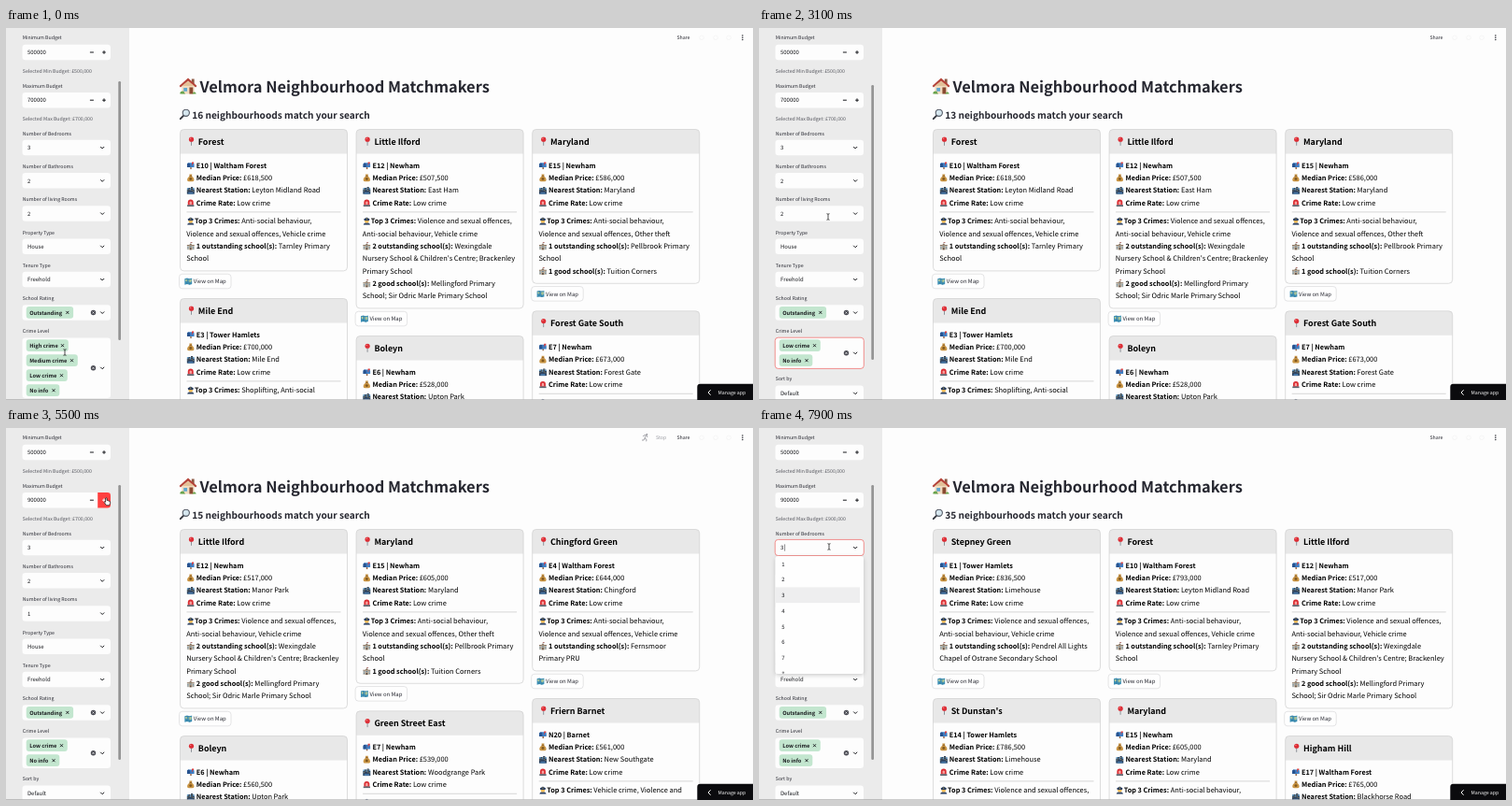
An HTML page for the animation above (8000 ms loop, 800 by 398 pixels).

```html
<!DOCTYPE html>
<html lang="en">
<head>
<meta charset="utf-8">
<title>Neighbourhood search</title>
<style>
html, body { margin: 0; width: 100%; height: 100%; overflow: hidden; background: #fdfdfd; }
svg.stage { display: block; width: 100vw; height: 100vh; }
text {
  font-family: 'Noto Sans CJK JP', 'Noto Sans CJK SC', 'Noto Sans CJK', 'Noto Sans', sans-serif;
  text-rendering: geometricPrecision;
  white-space: pre;
}
.b { font-weight: 700; }
tspan.b { font-size: .982em; }
</style>
</head>
<body>
<svg class="stage" viewBox="0 0 800 398">
  <defs>
    <filter id="shade" x="-10%" y="-10%" width="120%" height="125%">
      <feDropShadow dx="0" dy="1.5" stdDeviation="2" flood-opacity=".2"/>
    </filter>
    <symbol id="house" viewBox="0 0 20 20">
      <path d="M3 9h14v10H3z" fill="#f1dcc0"/>
      <path d="M14 2h3v6h-3z" fill="#8d5a44"/>
      <path d="M10 1 0 10l1.500 1.500L10 4.500l8.500 7L20 10z" fill="#b5443a"/>
      <path d="M10 4.500 3 10h14z" fill="#e3c097"/>
      <path d="M5 12h4v4H5z" fill="#5fa6cf"/>
      <path d="M11.500 11.500h4V19h-4z" fill="#8a4b32"/>
      <path d="M1 19a2.500 2.500 0 0 1 5-1l1 1zM15 19a2 2 0 0 1 4-.5v.5z" fill="#67a34c"/>
    </symbol>
    <symbol id="lens" viewBox="0 0 12 12">
      <path d="M5 7 1.300 10.900" stroke="#33363d" stroke-width="1.900" stroke-linecap="round"/>
      <circle cx="7.300" cy="4.500" r="3.600" fill="#d5e6ee" stroke="#555b66" stroke-width="1.100"/>
    </symbol>
    <symbol id="pin" viewBox="0 0 8 10">
      <path d="M4 4v5.500" stroke="#8b9299" stroke-width="1"/>
      <circle cx="4" cy="2.900" r="2.600" fill="#dd2e36"/>
      <circle cx="3.200" cy="2" r=".7" fill="#f58a8c"/>
    </symbol>
    <symbol id="mail" viewBox="0 0 10 10">
      <path d="M4.500 7h1.600v3H4.500z" fill="#8a5a3c"/>
      <path d="M.5 7.500V4a2 2 0 0 1 2-2H7.500a2 2 0 0 1 2 2v3.500z" fill="#3f7fc4"/>
      <path d="M.5 7.500V4a1.900 1.900 0 0 1 3.800 0v3.500z" fill="#27538f"/>
      <path d="M6.500 1h2.500v1.800H7.300V5h-.8z" fill="#d83b3b"/>
    </symbol>
    <symbol id="bag" viewBox="0 0 10 10">
      <path d="M3.300.5h3.600L6.200 2.800C8.500 4 9.500 6 9.300 8 9.100 9.800 7 10 5 10S.9 9.800.7 8c-.2-2 .8-4 3.200-5.200z" fill="#c99544"/>
      <path d="M3.300 2.700h3.500" stroke="#7c4f1e" stroke-width=".9"/>
      <circle cx="5" cy="6.500" r="1.700" fill="#81581f"/>
    </symbol>
    <symbol id="city" viewBox="0 0 10 10">
      <path d="M.3 2h9.400v8H.3z" fill="#6fa5cb"/>
      <path d="M.3 10V4h2V2h2v3h1V.8h2.500V4h1.900v6z" fill="#2f435f"/>
      <path d="M1 5.500h1M3 4h.8M6 2.500h1M6 5h1M8 6h1" stroke="#f2cf63" stroke-width=".7"/>
      <path d="M2 7.500h6V10H2z" fill="#4776a5"/>
    </symbol>
    <symbol id="siren" viewBox="0 0 10 10">
      <path d="M1.500 8V4.500a3.500 3.500 0 0 1 7 0V8z" fill="#db2f35"/>
      <path d="M3.600 7V4.600a1.400 1.400 0 0 1 2.800 0V7z" fill="#f7a3a0"/>
      <path d="M.7 7.700h8.600v2H.7z" fill="#5e6670"/>
    </symbol>
    <symbol id="officer" viewBox="0 0 10 10">
      <path d="M.8 10a4.200 3 0 0 1 8.400 0z" fill="#2c4266"/>
      <circle cx="5" cy="5" r="2.700" fill="#eeb95a"/>
      <path d="M1.300 2.500 5 .3l3.700 2.200L8 4.300H2z" fill="#263a5c"/>
      <circle cx="5" cy="2.200" r=".7" fill="#f0cc52"/>
    </symbol>
    <symbol id="school" viewBox="0 0 10 10">
      <path d="M.3 4.500h9.400V10H.3z" fill="#cfc8bb"/>
      <path d="M.3 3.700h9.400v1H.3zM2.800 3.800 5 1.700l2.200 2.100z" fill="#8a7460"/>
      <path d="M3 4.200h4V10H3z" fill="#b7aa98"/>
      <path d="M5 2V.3h1.800v1H5" fill="#c9453d" stroke="#777" stroke-width=".3"/>
      <path d="M.9 6.200h1.500M.9 8.200h1.500M7.600 6.200h1.500M7.600 8.200h1.500M4 5.800h2" stroke="#4f7896" stroke-width="1"/>
      <path d="M4.100 7.500h1.800V10H4.100z" fill="#5c483c"/>
    </symbol>
    <symbol id="map" viewBox="0 0 10 9">
      <path d="M.3 1 3.400.3l3.200.7L9.700.3v7.700l-3.100.7L3.400 8l-3.100.7z" fill="#3d8fb5"/>
      <path d="M1 2.500l2-.7 1 1.500L2.600 5 1.500 4zM5.500 2.200 8.800 2l.2 2.500-2 1.800-1.500-1.700z" fill="#b8cf9c"/>
      <path d="M3.400.3V8M6.600 1v7.700" stroke="#2b6b8a" stroke-width=".4"/>
    </symbol>
  </defs>
  <g id="main"></g>
  <g id="side"></g>
  <g id="cursor">
    <path id="beam" d="M-1.500-3.300Q0-3.300 0-2.500Q0-3.300 1.500-3.300M0-2.600V2.600M-1.500 3.300Q0 3.300 0 2.500Q0 3.300 1.500 3.300" fill="none" stroke="#222" stroke-width=".8"/>
    <path id="arrow" d="M0-2.800V3.200L1.400 2 2.300 4 3.300 3.600 2.400 1.700H4.300z" fill="#111" stroke="#fff" stroke-width=".5"/>
    <path id="hand" d="M-.9-2.500q.7-.8 1.400 0V0q1-.4 1.300.3 1-.3 1.200.5 1.100-.1 1.100.8V3L3.200 5.200H0L-2.500 1.800q.3-1 1.600-.1z" fill="#fff" stroke="#111" stroke-width=".7"/>
  </g>
</svg>
<script>
const LOOP = 8000;
const INK = '#262730', RED = '#ff4040', DARK = '#17181c';
const $ = id => document.getElementById(id);

// The font draws its Latin letters 1.117 times larger than the nominal size wanted here.
const FONT_RATIO = 1.117;
function text(x, cy, size, str, fill = DARK, bold = false) {
  const body = str.replace(/&/g, '&amp;').replace(/\*(.+?)\*/g, '<tspan class="b">$1</tspan>');
  return `<text x="${x}" y="${(cy + size * 0.33).toFixed(2)}" font-size="${(size / FONT_RATIO).toFixed(3)}" fill="${fill}"${bold ? ' class="b"' : ''}>${body}</text>`;
}
const rect = (x, y, w, h, fill, r = 0, extra = '') =>
  `<rect x="${x}" y="${y}" width="${w}" height="${h}" rx="${r}" fill="${fill}" ${extra}/>`;
const line = (d, color = DARK, width = 0.9) =>
  `<path d="${d}" fill="none" stroke="${color}" stroke-width="${width}"/>`;
const icon = (id, x, cy, w, h = w) =>
  `<use href="#${id}" x="${x}" y="${cy - h / 2}" width="${w}" height="${h}"/>`;

const VSO = 'Violence and sexual offences', ASB = 'Anti-social behaviour', VEH = 'Vehicle crime';
const violent = `${VSO},/${ASB}, ${VEH}`;
const social = `${ASB},/${VSO}, ${VEH}`;
const theft = `${ASB},/${VSO}, Other theft`;

// Lines are split by "/"; "#" opens a school row.
const tarnley = '#*1 outstanding school(s):* Tarnley Primary/School';
const ilford = "#*2 outstanding school(s):* Wexingdale/Nursery School & Children's Centre; Brackenley/Primary School/" +
  '#*2 good school(s):* Mellingford Primary/School; Sir Odric Marle Primary School';
const pellbrook = '#*1 outstanding school(s):* Pellbrook Primary/School/#*1 good school(s):* Tuition Corners';

const place = (name, area, price, station, crimes, schools = '') => ({ name, area, price, station, crimes, schools });
const forest = price => place('Forest', 'E10 | Waltham Forest', price, 'Leyton Midland Road', social, tarnley);
const little = (price, station) => place('Little Ilford', 'E12 | Newham', price, station, violent, ilford);
const maryland = price => place('Maryland', 'E15 | Newham', price, 'Maryland', theft, pellbrook);
const boleyn = price => place('Boleyn', 'E6 | Newham', price, 'Upton Park', violent);

const RESULTS = [
  [
    [forest('618,500'), place('Mile End', 'E3 | Tower Hamlets', '700,000', 'Mile End', `Shoplifting, Anti-social/behaviour, ${VSO}`)],
    [little('507,500', 'East Ham'), boleyn('528,000')],
    [maryland('586,000'), place('Forest Gate South', 'E7 | Newham', '673,000', 'Forest Gate', violent)],
  ],
  [
    [little('517,000', 'Manor Park'), boleyn('560,500')],
    [maryland('605,000'), place('Green Street East', 'E7 | Newham', '539,000', 'Woodgrange Park', violent)],
    [place('Chingford Green', 'E4 | Waltham Forest', '644,000', 'Chingford', social, '#*1 outstanding school(s):* Fernsmoor/Primary PRU'),
     place('Friern Barnet', 'N20 | Barnet', '561,000', 'New Southgate', `${VEH}, Violence and/sexual offences, ${ASB}`)],
  ],
  [
    [place('Stepney Green', 'E1 | Tower Hamlets', '836,500', 'Limehouse', violent,
       '#*1 outstanding school(s):* Pendrel All Lights/Chapel of Ostrane Secondary School'),
     place("St Dunstan's", 'E14 | Tower Hamlets', '786,500', 'Limehouse', violent)],
    [forest('793,000'), maryland('605,000')],
    [little('517,000', 'Manor Park'), place('Higham Hill', 'E17 | Waltham Forest', '765,000', 'Blackhorse Road', social)],
  ],
];

const ROW = 13.35, BODY = 8.333;

function card(x, y, p) {
  const lines = (p.crimes + (p.schools ? '/' + p.schools : '')).split('/');
  const h = 98 + ROW * lines.length;
  const row = (id, cy, str, dx = 17.3) => icon(id, x + 7, cy, 8.5) + text(x + dx, cy, BODY, str, '#000');
  let s = rect(x, y, 179, h, '#fdfdfd', 4);
  s += `<path d="M${x} ${y + 26}v-22a4 4 0 0 1 4-4h171a4 4 0 0 1 4 4v22z" fill="#e8e8e8"/>`;
  s += rect(x, y, 179, h, 'none', 4, 'stroke="#cfcfcf" stroke-width=".7"');
  s += icon('pin', x + 8, y + 12.8, 8, 10) + text(x + 19.3, y + 13, 10, p.name, '#000', true);
  [['mail', `*${p.area}*`], ['bag', `*Median Price:* £${p.price}`],
   ['city', `*Nearest Station:* ${p.station}`], ['siren', '*Crime Rate:* Low crime']].forEach(([id, str], i) => {
    s += row(id, y + 38.4 + i * ROW, str);
  });
  s += line(`M${x + 7} ${y + 88.4}h165`, '#c4c4c4', 0.7);
  lines.forEach((str, i) => {
    const cy = y + 98 + i * ROW;
    if (i === 0) s += row('officer', cy, '*Top 3 Crimes:* ' + str, 15.6);
    else if (str[0] === '#') s += row('school', cy, str.slice(1));
    else s += text(x + 6.7, cy, BODY, str, '#000');
  });
  const by = y + h + 3.3;
  s += rect(x - 1, by, 55.5, 15.6, '#fefefe', 3.3, 'stroke="#d3d3d6" stroke-width=".6"');
  s += icon('map', x + 4.5, by + 7.9, 8.6, 7.6) + text(x + 14.3, by + 7.9, 6.667, 'View on Map', INK);
  return [s, y + h + 29.6];
}

function drawMain(st) {
  let s = icon('house', 185.5, 62, 19, 20) + text(207.5, 62.6, 18.333, 'Velmora Neighbourhood Matchmakers', INK, true);
  s += icon('lens', 185.5, 92.3, 12) + text(199.3, 92.8, 11.3, `${st.count} neighbourhoods match your search`, INK, true);
  RESULTS[st.set].forEach((col, i) => {
    let y = 108.5;
    for (const p of col) {
      const [svg, next] = card(186.5 + i * 188.6, y, p);
      s += svg;
      y = next;
    }
  });
  if (st.run) {
    s += line('M682 9l2-1.5 2 .5 1 2M685 8.5l-1 2.5 2 1.3-.3 2M684 11l-1 2h-2', '#8b8c93', 0.8);
    s += '<circle cx="686.3" cy="6.9" r=".9" fill="#8b8c93"/>' + text(696, 10.3, 5.833, 'Stop', '#9a9ba2');
  }
  s += text(718.4, 10.3, 5.833, 'Share', INK);
  for (const x of [745, 760, 774]) s += `<circle cx="${x}" cy="10.3" r="2.3" fill="none" stroke="#f3f3f3" stroke-width=".7"/>`;
  for (const y of [8, 10.2, 12.4]) s += `<circle cx="788.8" cy="${y}" r=".75" fill="${INK}"/>`;
  s += rect(0, 397.3, 800, 0.7, '#b9b9b9');
  s += '<path d="M740.3 398v-14a3.3 3.3 0 0 1 3.3-3.300H800V398z" fill="#0b0b0e"/>';
  return s + line('M754.6 387.3l-2.6 2.7 2.6 2.7', '#fff', 1) + text(762.6, 390, 5.833, 'Manage app', '#fff');
}

const FIELD_H = 16.6;
const label = (cy, str) => text(17.8, cy, 5.833, str, INK);
const caption = (cy, str) => text(17.8, cy, 5.833, str, '#52535b');
const chevron = cy => line(`M101.2 ${cy - 1}l2 2 2-2`, DARK, 1);

function box(cy, focus, h = FIELD_H) {
  const grow = focus ? 0.3 : 0;
  return rect(17.5 - grow, cy - h / 2 - grow, 94.5 + 2 * grow, h + 2 * grow, '#fdfdfd', 3.3,
    focus ? 'stroke="#f0625f" stroke-width=".7"' : '');
}
const select = (cy, value, focus = false) => box(cy, focus) + text(23, cy, 6.667, value) + chevron(cy);

function number(cy, value, hot) {
  let s = box(cy);
  if (hot) s += `<path d="M98.2 ${cy - 8.3}h10.5a3.3 3.3 0 0 1 3.3 3.3v10a3.3 3.3 0 0 1-3.3 3.3H98.2z" fill="${RED}"/>`;
  return s + text(23, cy, 6.667, value) + line(`M89.9 ${cy}h4`, DARK, 1) +
    line(`M103.2 ${cy}h3.6M105 ${cy - 1.8}v3.6`, hot ? '#fff' : DARK, 1);
}

function tags(top, list, focus) {
  const h = list.length * 16 + 0.6, cy = top + h / 2;
  let s = box(cy, focus, h);
  list.forEach(([name, w], i) => {
    const y = top + 8.2 + i * 16, cx = 22 + w - 6;
    s += rect(21.7, y - 6.4, w + 0.6, 12.8, '#c3e6cf', 3) + text(25.2, y, 6.4, name, DARK, true);
    s += line(`M${cx - 1.5} ${y - 1.5}l3 3m0-3l-3 3`);
  });
  s += `<circle cx="93.5" cy="${cy}" r="2.7" fill="#4b4c54"/>`;
  s += line(`M92.5 ${cy - 1}l2 2m0-2l-2 2`, '#fff', 0.7);
  return s + chevron(cy);
}

function menu(cy, chosen) {
  const top = cy + 9;
  let s = rect(17.5, top, 94.5, 126, '#fefefe', 3, 'filter="url(#shade)"');
  s += `<svg x="17.5" y="${top}" width="94.5" height="125.5">`;
  for (let i = 0; i < 8; i++) {
    const y = 8.3 + i * 16.75;
    if (i + 1 === chosen) s += rect(0, y - 8.4, 90.5, 16.75, '#eeeeef');
    s += text(6.8, y, 6.667, String(i + 1));
  }
  return s + '</svg>';
}

const CRIME_TAGS = [['High crime', 44.5], ['Medium crime', 54.5], ['Low crime', 43.5], ['No info', 35]];
const SCROLLBAR = { 4: [57, 334], 3: [60, 344], 2: [61, 355] };
const BEDS = 128, LIVING = 198.5;

function drawSide(st) {
  let s = rect(0, 0, 132, 398, '#ebebeb');
  s += label(10.5, 'Minimum Budget') + number(26, '500000');
  s += caption(45.7, 'Selected Min Budget: £500,000');
  s += label(61.8, 'Maximum Budget') + number(77.2, st.max + '00000', st.hot);
  s += caption(96.9, `Selected Max Budget: £${st.shown}00,000`);
  s += label(113, 'Number of Bedrooms') + select(BEDS, '3', st.focus === 'beds');
  s += label(148.2, 'Number of Bathrooms') + select(163.3, '2');
  s += label(183.4, 'Number of living Rooms') + select(LIVING, st.living, st.focus === 'living');
  s += label(218.6, 'Property Type') + select(233.8, 'House');
  s += label(253.9, 'Tenure Type') + select(269, 'Freehold');
  s += label(289.2, 'School Rating') + tags(296.2, [['Outstanding', 49.8]], false);
  s += label(324.2, 'Crime Level') + tags(331.5, CRIME_TAGS.slice(4 - st.tags), st.focus === 'crime');
  const end = 331.5 + st.tags * 16;
  s += label(end + 12, 'Sort by') + select(end + 27.3, 'Default');
  const [from, to] = SCROLLBAR[st.tags];
  s += rect(120.3, from, 2.7, to - from, '#949494', 1.3);
  if (st.caret) s += line(`M27.6 ${st.caret - 3.6}v7.2`, DARK, 0.5);
  if (st.menu) s += menu(st.menu, st.pick);
  return s + rect(0, 397.3, 132, 0.7, '#a9a9a9');
}

// Picks the value of the last step whose start time has passed.
const step = (t, first, ...steps) => steps.reduce((v, [at, next]) => (t >= at ? next : v), first);
const within = (t, a, b) => t >= a && t < b;

function stateAt(t) {
  const focus = step(t, '', [600, 'crime'], [3400, 'living'], [5200, ''], [7300, 'beds']);
  const field = { living: LIVING, beds: BEDS }[focus] || 0;
  return {
    focus,
    count: step(t, 16, [900, 15], [1800, 13], [4900, 15], [5900, 35]),
    set: step(t, 0, [4900, 1], [5900, 2]),
    run: within(t, 600, 1000) || within(t, 1400, 1800) || within(t, 4300, 5000) || within(t, 5200, 6000),
    tags: step(t, 4, [600, 3], [1400, 2]),
    max: step(t, 7, [5200, 8], [5350, 9]),
    shown: step(t, 7, [5900, 9]),
    living: step(t, '2', [4200, '1']),
    hot: within(t, 5000, 7300),
    caret: t % 1000 >= 500 ? field : 0,
    menu: within(t, 3400, 4200) || t >= 7300 ? field : 0,
    pick: step(t, 2, [3750, 1], [7000, 3]),
  };
}

// time, x, y, shape from then on
const PATH = [
  [0, 63, 347, 'beam'], [100, 63, 347, 'beam'], [480, 61, 341, 'hand'], [750, 61, 341, 'hand'],
  [1200, 71.5, 342, 'hand'], [1900, 71.5, 342, 'hand'], [2300, 75, 318, 'arrow'], [2500, 75, 318, 'arrow'],
  [3000, 74, 202, 'beam'], [3450, 74, 202, 'beam'], [3800, 68, 216, 'hand'], [4250, 68, 216, 'beam'],
  [4600, 84, 92, 'beam'], [5000, 107.5, 77.5, 'hand'], [6050, 107.5, 77.5, 'arrow'],
  [6500, 84, 113, 'arrow'], [6900, 84, 113, 'arrow'], [7200, 75, 127, 'beam'], [LOOP, 75, 127, 'beam'],
];

function moveCursor(t) {
  const i = PATH.findIndex(p => p[0] > t) - 1;
  const [t0, x0, y0, shape] = PATH[i], [t1, x1, y1] = PATH[i + 1];
  const u = (t - t0) / (t1 - t0), e = u * u * (3 - 2 * u);
  $('cursor').setAttribute('transform', `translate(${x0 + (x1 - x0) * e} ${y0 + (y1 - y0) * e})`);
  for (const id of ['beam', 'arrow', 'hand']) $(id).style.display = id === shape ? '' : 'none';
}

// Redraws a layer only when its part of the state has changed.
const drawn = {};
function update(id, draw, st, keys) {
  const key = keys.map(k => st[k]).join();
  if (drawn[id] === key) return;
  drawn[id] = key;
  $(id).innerHTML = draw(st);
}

function frame() {
  const t = performance.now() % LOOP;
  const st = stateAt(t);
  update('main', drawMain, st, ['count', 'set', 'run']);
  update('side', drawSide, st, ['tags', 'max', 'shown', 'living', 'hot', 'focus', 'caret', 'menu', 'pick']);
  moveCursor(t);
  requestAnimationFrame(frame);
}

frame();
</script>
</body>
</html>
```
